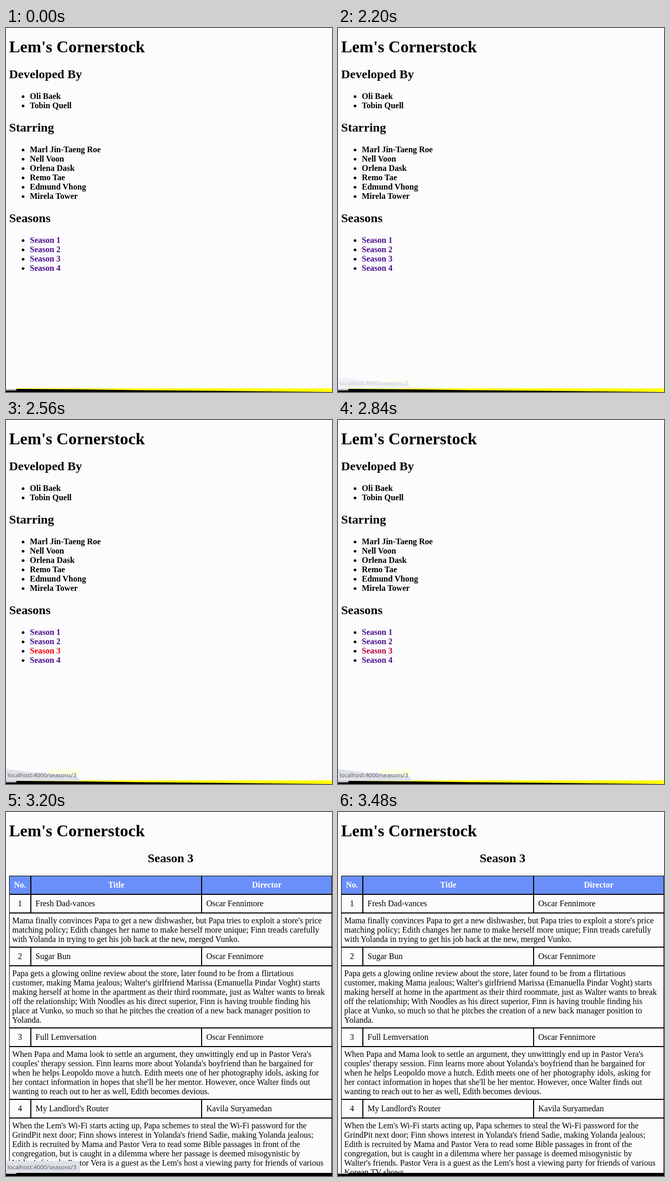
Recreate the animation shown at these times as an HTML page. Size 630 by 703 pixels, loop 3.64 s.

```html
<!DOCTYPE html>
<html lang="en">
<head>
<meta charset="utf-8">
<title>Season guide</title>
<style>
  html, body { margin: 0; width: 100%; height: 100%; overflow: hidden; background: #fcfcfe; }
  svg { display: block; font: 16px "Liberation Serif", "Times New Roman", serif; }
  .bold { font-weight: bold; }
  .h1 { font-size: 32px; }
  .h2 { font-size: 24px; }
  .link { fill: #4b0f8b; }
  .mid { text-anchor: middle; }
  .head { fill: #fff; }
  .cell { fill: none; stroke: #000; }
  .cell.blue { fill: #6a8ffa; }
  .url { font: 11.25px "Open Sans", sans-serif; fill: #50555c; }
</style>
</head>
<body>
<svg id="stage" width="630" height="703" viewBox="0 0 630 703"></svg>
<script>
const LOOP = 3640, STEP = 40;
const HOVER_IN = 2200, HOVER_OUT = 2760, FADE = 500, OPEN_PAGE = 3200;

const text = (x, y, str, cls = '') => `<text x="${x}" y="${y}" class="${cls}">${str}</text>`;
const cell = (x, y, w, h, cls = '') =>
  `<rect x="${x + .5}" y="${y + .5}" width="${w - 1}" height="${h - 1}" class="cell ${cls}"/>`;

const sections = [
  ['Developed By', 97, ['Oli Baek', 'Tobin Quell']],
  ['Starring', 200, ['Marl Jin-Taeng Roe', 'Nell Voon', 'Orlena Dask', 'Remo Tae', 'Edmund Vhong', 'Mirela Tower']],
  ['Seasons', 375, ['Season 1', 'Season 2', 'Season 3', 'Season 4']]
];

const episodes = [
  ['Fresh Dad-vances', 'Oscar Fennimore', [
    "Mama finally convinces Papa to get a new dishwasher, but Papa tries to exploit a store's price",
    'matching policy; Edith changes her name to make herself more unique; Finn treads carefully',
    'with Yolanda in trying to get his job back at the new, merged Vunko.']],
  ['Sugar Bun', 'Oscar Fennimore', [
    'Papa gets a glowing online review about the store, later found to be from a flirtatious',
    "customer, making Mama jealous; Walter's girlfriend Marissa (Emanuella Pindar Voght) starts",
    'making herself at home in the apartment as their third roommate, just as Walter wants to break',
    'off the relationship; With Noodles as his direct superior, Finn is having trouble finding his',
    'place at Vunko, so much so that he pitches the creation of a new back manager position to',
    'Yolanda.']],
  ['Full Lemversation', 'Oscar Fennimore', [
    'When Papa and Mama look to settle an argument, they unwittingly end up in Pastor Vera\'s',
    "couples' therapy session. Finn learns more about Yolanda's boyfriend than he bargained for",
    'when he helps Leopoldo move a hutch. Edith meets one of her photography idols, asking for',
    "her contact information in hopes that she'll be her mentor. However, once Walter finds out",
    'wanting to reach out to her as well, Edith becomes devious.']],
  ["My Landlord's Router", 'Kavila Suryamedan', [
    "When the Lem's Wi-Fi starts acting up, Papa schemes to steal the Wi-Fi password for the",
    "GrindPit next door; Finn shows interest in Yolanda's friend Sadie, making Yolanda jealous;",
    'Edith is recruited by Mama and Pastor Vera to read some Bible passages in front of the',
    'congregation, but is caught in a dilemma where her passage is deemed misogynistic by',
    "Walter's friends. Pastor Vera is a guest as the Lem's host a viewing party for friends of various",
    'Korean TV shows.']]
];

function homePage() {
  let out = '';
  for (const [title, y, items] of sections) {
    out += text(6, y, title, 'bold h2');
    items.forEach((item, i) => {
      const base = y + 40 + i * 18;
      out += `<circle cx="33" cy="${base - 4.5}" r="2.6"/>` +
        text(46, base, item, title === 'Seasons' ? 'bold link' : 'bold');
    });
  }
  return out + `<path fill="#ff0" d="M20 696H630V703H20z"/>
    <path d="M0 700H20V697L150 698L258 699.5L630 703H0z"/>
    <path fill="#bbb" d="M0 697H20V700H0z"/>`;
}

function row(y, texts, cls, textCls) {
  const [no, title, director] = texts, base = y + 23, head = textCls !== '';
  return cell(6, y, 42, 36, cls) + cell(48, y, 330, 36, cls) + cell(378, y, 252, 36, cls) +
    text(27, base, no, 'mid ' + textCls) +
    text(head ? 213 : 57, base, title, textCls) +
    text(head ? 504 : 387, base, director, textCls);
}

function seasonPage() {
  let y = 123;
  let out = text(318, 97, 'Season 3', 'bold h2 mid') +
    row(y, ['No.', 'Title', 'Director'], 'blue', 'bold head mid');
  y += 36;
  episodes.forEach(([title, director, lines], i) => {
    out += row(y, [i + 1, title, director], '', '');
    y += 36;
    const height = lines.length * 18 + 12;
    out += cell(6, y, 624, height);
    lines.forEach((line, n) => out += text(12, y + 20 + n * 18, line));
    y += height;
  });
  return out + '<path d="M0 697H630V703H0z"/><path fill="#bbb" d="M0 697H20V699H0z"/>';
}

const stage = document.getElementById('stage');
stage.innerHTML = `<rect width="630" height="703" fill="#fcfcfe"/>
  ${text(6, 47, "Lem's Cornerstock", 'bold h1')}
  <g id="home">${homePage()}</g>
  <g id="season">${seasonPage()}</g>
  <g id="status">
    <g id="paleBox"><path fill="#ffffe4" d="M80 674H143V687L80 684z"/>
      <path fill="#dee1e6" d="M0 674L80 684L136 687L145 697H0z"/></g>
    <path id="solidBox" fill="#dee1e6" d="M0 674H139Q143 674 143 678V697H0z"/>
    ${text(3, 690, 'localhost:4000/seasons/3', 'url')}
  </g>`;

const [home, season, status, paleBox, solidBox] =
  ['home', 'season', 'status', 'paleBox', 'solidBox'].map(id => document.getElementById(id));
const hovered = home.querySelectorAll('.link')[2];

const clamp = v => Math.min(1, Math.max(0, v));
const ease = v => 1 - (1 - clamp(v)) ** 3;
const show = (el, on) => el.style.display = on ? '' : 'none';
const purple = [75, 15, 139], red = [255, 0, 0];

function draw(now) {
  const t = Math.floor(now % LOOP / STEP) * STEP;
  const opened = t >= OPEN_PAGE;
  show(home, !opened);
  show(season, opened);
  show(paleBox, !opened);
  show(solidBox, opened);

  const heat = ease((t - HOVER_IN) / FADE) - ease((t - HOVER_OUT) / FADE);
  hovered.style.fill = `rgb(${purple.map((c, i) => Math.round(c + (red[i] - c) * heat))})`;
  status.style.opacity = Math.min(clamp((t - 2160) / 120), clamp((3480 - t) / 200));
  requestAnimationFrame(() => draw(performance.now() - start));
}
const start = performance.now();
draw(0);
</script>
</body>
</html>
```
